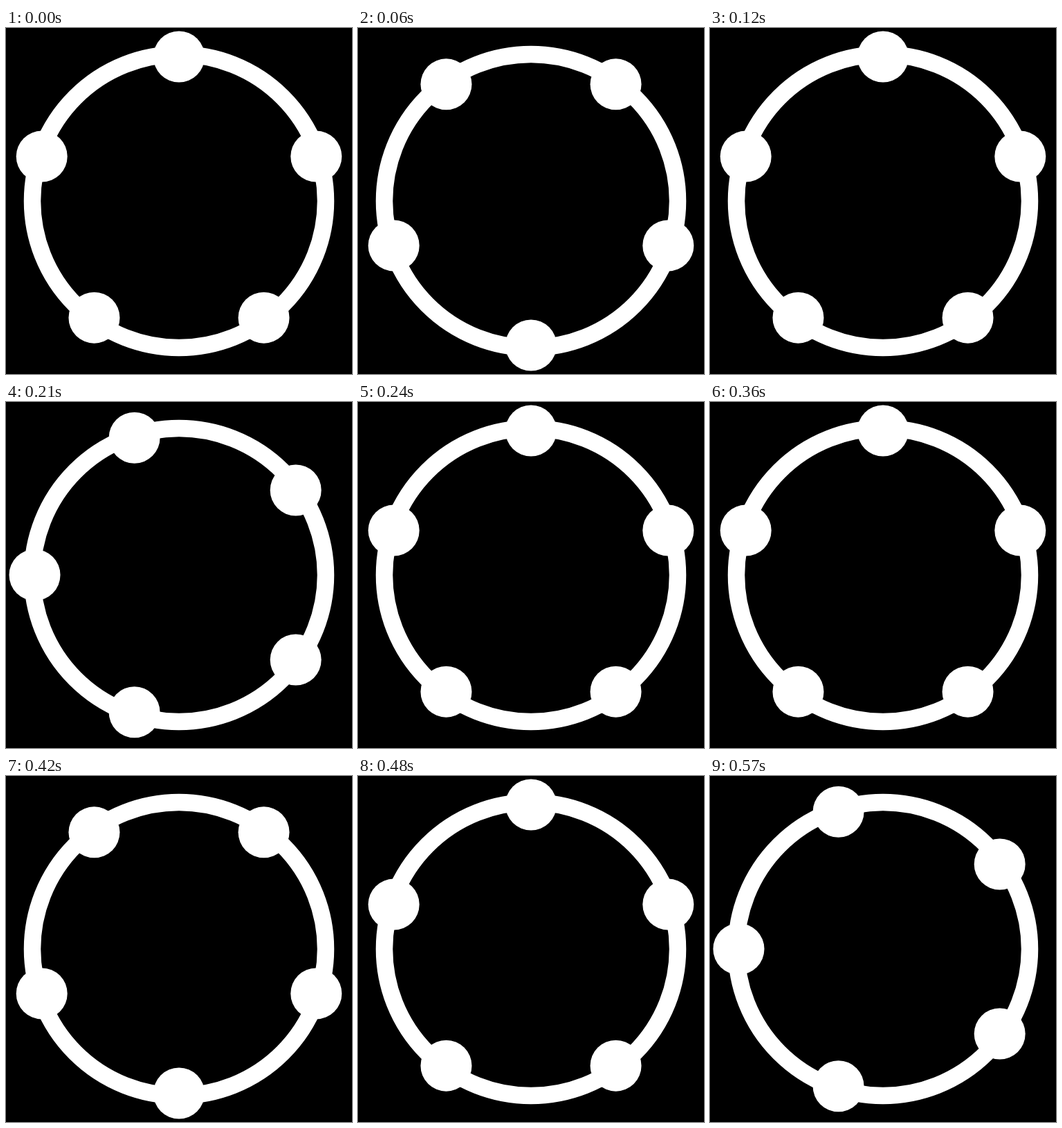
Write an HTML page that moves like this. It is 500 by 500 pixels and loops after 0.6 s.

```html
<!DOCTYPE html>
<html lang="en">
<head>
<meta charset="utf-8">
<title>Turning ring</title>
<style>
  html, body { margin: 0; width: 100%; height: 100%; overflow: hidden; background: #000; }
  svg { display: block; width: 100%; height: 100%; }
</style>
</head>
<body>
<svg viewBox="0 0 500 500">
  <circle cx="250" cy="250" r="212" fill="none" stroke="#fff" stroke-width="24.5"/>
  <g id="dots" fill="#fff"></g>
</svg>
<script>
  const SVG_NS = "http://www.w3.org/2000/svg";
  const CENTER = 250, ORBIT = 208.5, DOT_RADIUS = 37, DOT_COUNT = 5;
  const LOOP_MS = 600, STEP_MS = 30, STEP_DEGREES = 18;

  const group = document.getElementById("dots");
  const dots = Array.from({ length: DOT_COUNT }, () => {
    const dot = document.createElementNS(SVG_NS, "circle");
    dot.setAttribute("r", DOT_RADIUS);
    return group.appendChild(dot);
  });

  // The dots advance clockwise in discrete steps, one full turn per loop.
  function render(time) {
    const step = Math.floor((time % LOOP_MS) / STEP_MS + 0.01);
    dots.forEach((dot, i) => {
      const degrees = step * STEP_DEGREES + i * 360 / DOT_COUNT - 90;
      const angle = degrees * Math.PI / 180;
      dot.setAttribute("cx", CENTER + ORBIT * Math.cos(angle));
      dot.setAttribute("cy", CENTER + ORBIT * Math.sin(angle));
    });
  }

  const start = performance.now();
  function tick() {
    render(Math.max(0, performance.now() - start));
    requestAnimationFrame(tick);
  }
  tick();
</script>
</body>
</html>
```
